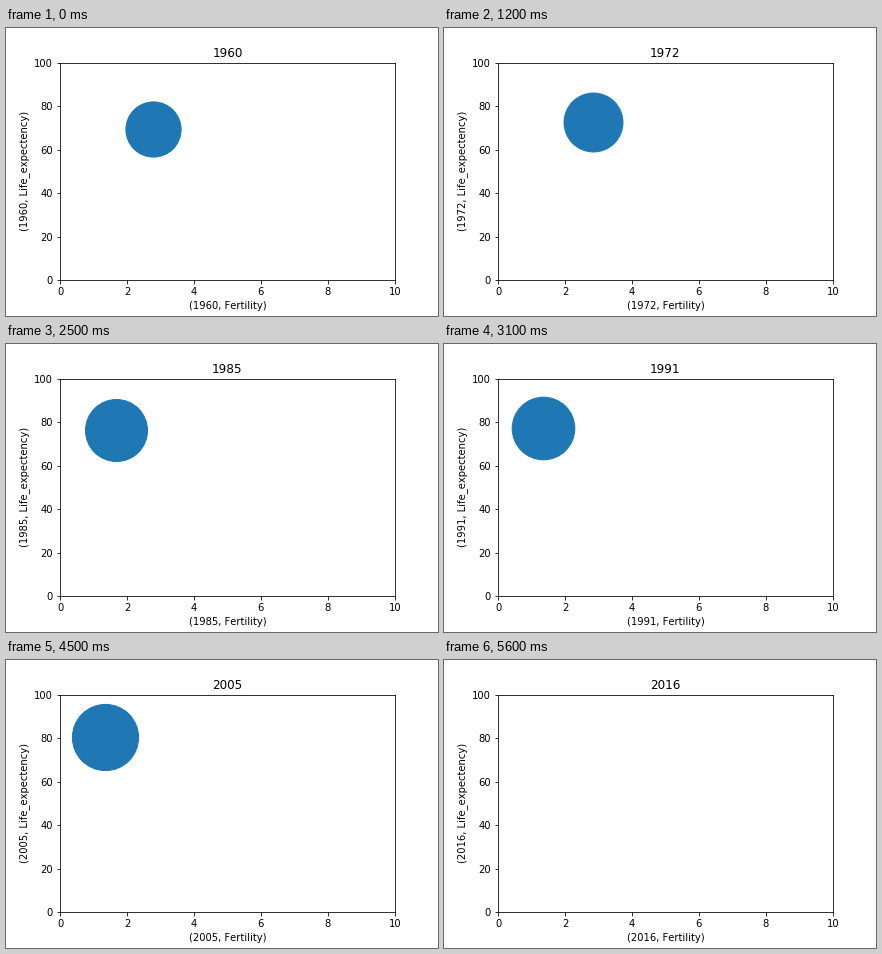
A matplotlib script that plays this animation: 432x288 px, repeating every 5700 ms.

```python
import numpy as np
import matplotlib.pyplot as plt
from matplotlib.animation import FuncAnimation

plt.rcParams.update({
    "font.family": "DejaVu Sans",
    "text.kerning_factor": 6,  # whole-pixel letter spacing
})

FIRST, LAST = 1960, 2016

# turning points of each trend: {year: value}
FERTILITY = {1960: 2.78, 1966: 2.86, 1974: 2.83, 1977: 2.61, 1982: 1.94,
             1986: 1.57, 1991: 1.33, 1998: 1.17, 2008: 1.43, 2015: 1.32}
LIFE = {1960: 69.3, 1970: 72.2, 1980: 75.4, 1992: 77.4, 2015: 82.9}
MILLIONS = {1960: 30.45, 1977: 36.5, 1985: 38.45, 2000: 40.4, 2008: 45.9,
            2015: 46.5}


def trend(points, year):
    return np.interp(year, list(points), list(points.values()))


fig, ax = plt.subplots(figsize=(6, 4), dpi=72)
fig.subplots_adjust(left=0.125, right=0.9, bottom=0.125, top=0.88)
ax.set(xlim=(0, 10), ylim=(0, 100))
bubble = ax.scatter([0], [0], s=[0], c="C0")


def draw(i):
    year = FIRST + i
    bubble.set_offsets([[trend(FERTILITY, year), trend(LIFE, year)]])
    bubble.set_sizes([100 * trend(MILLIONS, year)])
    bubble.set_visible(year < LAST)  # the last year has no data
    ax.set_title(str(year))
    ax.set_xlabel(f"({year}, Fertility)")
    ax.set_ylabel(f"({year}, Life_expectency)")
    return [bubble]


anim = FuncAnimation(fig, draw, frames=LAST - FIRST + 1, interval=100,
                     repeat=True, repeat_delay=0, blit=False)
plt.show()
```
